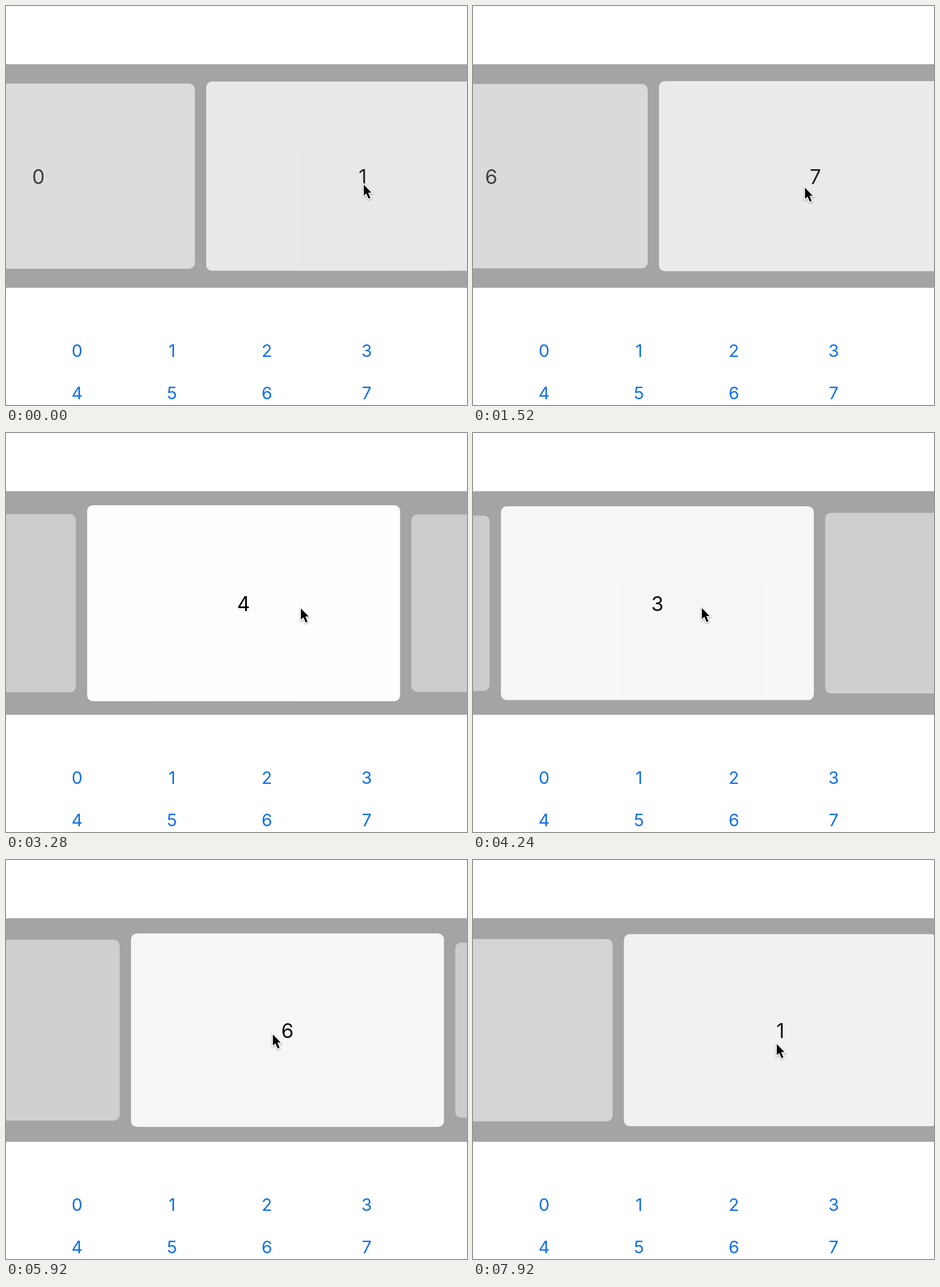
Animation of 804x697 px, one loop 8 s. Source, as an HTML page:

```html
<!DOCTYPE html>
<html lang="en">
<head>
<meta charset="utf-8">
<title>Carousel</title>
<style>
  html, body { margin: 0; width: 100%; height: 100%; overflow: hidden; background: #fff; }
  svg { display: block; width: 804px; height: 697px; }
  text { font-family: Inter, Roboto, sans-serif; text-anchor: middle; }
  .card text { font-size: 35px; }
  #buttons { font-size: 30px; fill: #0f6fec; }
  #cursor { filter: drop-shadow(0 1px 1.2px rgba(0, 0, 0, .4)); }
</style>
</head>
<body>
<svg viewBox="0 0 804 697">
  <rect y="101.7" width="804" height="390.6" fill="#a4a4a4"/>
  <g id="cards"></g>
  <g id="buttons"></g>
  <path id="cursor" d="M2 4V23.5L6.3 19.4L10.3 28.5L13.6 27L9.7 18H15.5Z"
        fill="#000" stroke="#fff" stroke-width="3.4" paint-order="stroke"/>
</svg>
<script>
const LOOP = 8000, COUNT = 8, FIRST_PAGE = 1;
const CENTER_X = 402, CENTER_Y = 297.3, CARD_W = 545.8, PITCH = 565.5;

// Each swipe drags half a page, then snaps the rest of the way.
const DRAG_MS = 320, SNAP_MS = 200, DRAG_PART = .5;
const swipeStarts = [-248, 511, 1300, 1862, 2565, 3267, 4150, 4831, 5537, 6243, 6900, 7557];
const direction = i => i < swipeStarts.length / 2 ? -1 : 1;

// Where the hand rests between swipes: time, x, y.
const handPath = [
  [0, 402, 308], [800, 339, 307], [2080, 415, 318.5], [3280, 500, 302.5],
  [5120, 457, 301], [6640, 486, 300.5], [7920, 558, 317.5]
];

const clamp01 = v => Math.min(1, Math.max(0, v));
const remaining = (t, power) => (1 - clamp01((t - DRAG_MS) / SNAP_MS)) ** power;
const dragged = t => DRAG_PART * clamp01(t / DRAG_MS);
const progress = t => dragged(t) + (1 - DRAG_PART) * (1 - remaining(t, 3));

function restingHand(t) {
  const i = Math.max(1, handPath.findIndex(([time]) => time > t));
  const next = t >= handPath.at(-1)[0] ? handPath.length - 1 : i;
  const [t0, x0, y0] = handPath[next - 1], [t1, x1, y1] = handPath[next];
  const u = clamp01((t - t0) / (t1 - t0));
  return { x: x0 + (x1 - x0) * u, y: y0 + (y1 - y0) * u };
}

function pose(t) {
  const { x, y } = restingHand(t);
  let page = FIRST_PAGE, pull = 0;
  swipeStarts.forEach((start, i) => {
    const age = t - start;
    page += direction(i) * progress(age);
    pull -= direction(i) * PITCH * dragged(age) * remaining(age, 9);
  });
  return { page, x: x + pull, y };
}

function add(parent, tag, attrs) {
  const node = document.createElementNS("http://www.w3.org/2000/svg", tag);
  for (const key in attrs) node.setAttribute(key, attrs[key]);
  return parent.appendChild(node);
}

const byId = id => document.getElementById(id);
const cursor = byId("cursor");
const columns = [124, 289.5, 455, 629];
for (let i = 0; i < COUNT; i++) {
  add(byId("buttons"), "text", { x: columns[i % 4], y: i < 4 ? 613 : 687 }).textContent = i;
}
const cards = Array.from({ length: 4 }, () => {
  const group = add(byId("cards"), "g", { class: "card" });
  return {
    group,
    rect: add(group, "rect", { x: -CARD_W / 2, width: CARD_W, rx: 10, fill: "#fff" }),
    label: add(group, "text", { y: 311 })
  };
});

function draw(t) {
  const { page, x, y } = pose(t);
  cards.forEach(({ group, rect, label }, slot) => {
    const index = Math.floor(page) - 1 + slot;
    const offset = (index - page) * PITCH;
    const distance = Math.abs(offset);
    const height = 343 - distance * .0568;
    group.setAttribute("transform", `translate(${CENTER_X + offset} 0)`);
    group.setAttribute("opacity", Math.max(.43, 1 - distance * .0011));
    rect.setAttribute("y", CENTER_Y - height / 2);
    rect.setAttribute("height", height);
    label.textContent = (index + COUNT) % COUNT;
  });
  cursor.setAttribute("transform", `translate(${x} ${y})`);
}

const start = performance.now();
function tick() {
  draw((performance.now() - start) % LOOP);
  requestAnimationFrame(tick);
}
tick();
</script>
</body>
</html>
```
